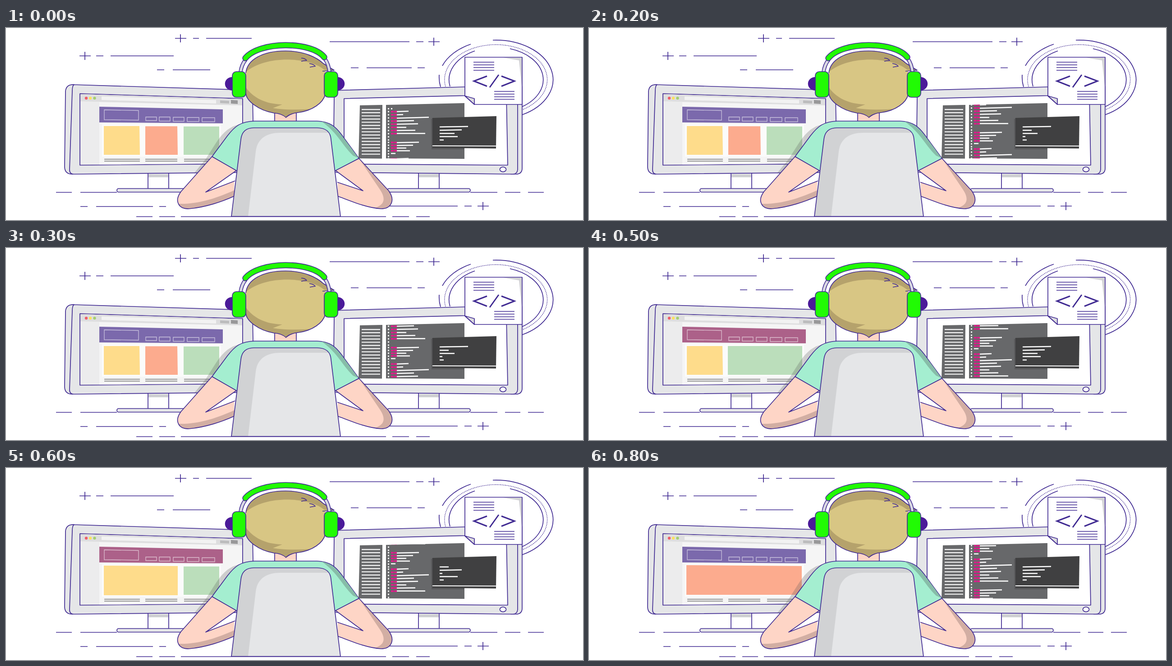
An HTML page without scripts that plays this animation: 1280x427 px, repeating every 900 ms.

```html
<!DOCTYPE html>
<html lang="en">
<head>
<meta charset="utf-8">
<title>Developer at work</title>
<style>
html, body { margin: 0; width: 100%; height: 100%; overflow: hidden; background: #fff; }
svg { display: block; width: 100vw; height: 100vh; }
.ink { stroke: #402a92; stroke-width: 1.7; stroke-linejoin: round; }
.line { fill: none; }
.dots { stroke-width: 1.3; stroke-dasharray: 2 1.6; }
.tag { stroke-width: 3; stroke-linejoin: miter; }
.white { fill: none; stroke: #fff; }
.case { fill: #e5e6e8; }
.skin { fill: #fed5c6; }
.skin-dark { fill: #d2aea3; }
.hair { fill: #d8c684; }
.hair-dark { fill: #b5a26c; }
.lime { fill: #21fb04; }
.yellow { fill: #fedc8b; }
.orange { fill: #fcab8e; }
.green { fill: #bbdebb; }

.scroll { animation: scroll .9s steps(9) infinite; }
.state, .bar { animation: .9s step-end infinite; }
.bar { animation-name: bar; }
.state { visibility: hidden; }
.cards { animation-name: cards; }
.right-wide { animation-name: right-wide; }
.left-wide { animation-name: left-wide; }
.full { animation-name: full; }
.term-a { animation-name: term-a; }
.term-b { animation-name: term-b; }
.term-c { animation-name: term-c; }

@keyframes scroll { to { transform: translateY(-99px); } }
@keyframes bar { 0%, 77.7% { fill: #7b69ac; } 44.4% { fill: #ac6189; } }
@keyframes cards { 0% { visibility: visible; } 44.4%, 100% { visibility: hidden; } }
@keyframes right-wide { 0%, 66.6%, 100% { visibility: hidden; } 44.4% { visibility: visible; } }
@keyframes left-wide { 0%, 77.7%, 100% { visibility: hidden; } 66.6% { visibility: visible; } }
@keyframes full { 0% { visibility: hidden; } 77.7%, 100% { visibility: visible; } }
@keyframes term-a { 0%, 44.4%, 88.8% { visibility: visible; } 22.2%, 66.6% { visibility: hidden; } }
@keyframes term-b { 0%, 44.4%, 100% { visibility: hidden; } 22.2% { visibility: visible; } }
@keyframes term-c { 0%, 88.8%, 100% { visibility: hidden; } 66.6% { visibility: visible; } }
</style>
</head>
<body>
<svg viewBox="0 0 1280 427" preserveAspectRatio="none">
  <defs>
    <clipPath id="editor"><path d="M843 171L1017 167V291L843 290Z"/></clipPath>
    <g id="plus"><path class="ink line" d="M-12 0H13M0 -9V9"/></g>
    <g id="code">
      <path class="white" stroke-width="3" stroke-dasharray="3 4" d="M848.5 -.5V66"/>
      <path class="white" stroke-width="3" stroke-dasharray="3 3.3" d="M848.5 68V104"/>
      <path stroke="#e5178c" stroke-width="3.5" stroke-dasharray="6 1" d="M854 1h13m-13 7h13m-13 7h13m-13 7h13m-13 7h13m-13 7h13m-13 7h13m-13 7h13M854 69.5h13m-13 6.5h13m-13 6h13m-13 6h13"/>
      <path class="white" stroke-width="2.4" d="M867 1L893 0M867 8L881 7.5M867 15.5L938 13.5M867 22L905 21M867 29L914 28M867 36H888M867 43L908 42.5M867 49.5H930M867 70L916 69M867 76.2L903 75.7M867 82H888M867 88H896M854 94h10"/>
    </g>
    <g id="stand">
      <path class="ink" fill="#fff" d="M315 322V358H361V322"/>
      <path fill="#cfd0d2" d="M316 325H360V332H316Z"/>
    </g>
  </defs>
  <rect width="1280" height="427" fill="#fff"/>

  <!-- Background dashes -->
  <use href="#plus" x="387" y="23"/>
  <use href="#plus" x="175" y="62"/>
  <use href="#plus" x="949" y="30.5"/>
  <use href="#plus" x="1058" y="396"/>
  <path class="ink line" d="M415 23h13M444 23H545M200 62h16M232 62H372M335 93h16M370 93H453
    M718 30.5H895M910 30.5h16M765 88.500h17M800 88.500H900M913 88.500h16
    M111 365.500h35M165 365.500H246M1030 365.500H1090M1107 365.500h34M1158 365.500h35
    M165 397h16M200 397H326M340 397h15M850 396H1002M1017 396h16
    M289 419.500h36M340 419.500h35M388 419.500H843M857 419.500h37M910 419.500h30"/>

  <!-- Rings -->
  <g class="ink line">
    <path d="M1080 27A127 88 0 0 1 1145 193M968 84A127 88 0 0 1 1031 36M961 104Q960 118 964 131"/>
    <path d="M985 130A104 72 0 0 1 1040 51M1118 46A104 72 0 0 1 1145 175"/>
    <path class="dots" d="M975 130A114 78 0 0 1 1087 37A114 78 0 0 1 1145 182"/>
  </g>

  <!-- Left monitor -->
  <use href="#stand"/>
  <rect class="ink" fill="#e5e6e8" x="246" y="357" width="150" height="8" rx="4"/>
  <g class="ink case">
    <path d="M151 126Q134 125 132 140L130 308Q130 325 147 325Z"/>
    <path d="M149 126L535 138Q547 139 547 150L550 321L150 325Q141 325 141 315L147 140Q147 128 151 126Z"/>
    <path fill="#ececed" d="M164 146L525 157V302L164 305Z"/>
  </g>
  <path fill="#ececed" d="M165 147L524 158V301L165 304Z"/>
  <path fill="#f5f5f5" d="M207 165L524 172V301L207 304Z"/>
  <path fill="#dededf" d="M165 147L524 158V172L165 163Z"/>
  <path fill="#f2f2f2" d="M212 152L466 160V168L212 160Z"/>
  <path fill="#bcbcbd" d="M475 161L495 162V168L475 167Z"/>
  <path fill="#989899" d="M499 160L514 161V169L499 168Z"/>
  <circle cx="178" cy="156" r="3.2" fill="#ee5e6b"/>
  <circle cx="187" cy="156" r="3.2" fill="#fee15f"/>
  <circle cx="196.5" cy="156" r="3.2" fill="#a5cf72"/>
  <path class="bar" fill="#7b69ac" d="M207 175L481 181V212L207 210Z"/>
  <path class="white" stroke-opacity=".6" stroke-width="1.3" d="M218 182L294 183.500V205L218 204ZM310 198h24v8h-24zM340 198h24v9h-24zM371 198.500h24v9h-24zM402 199h26v9h-26zM435 199.500h28v9h-28z"/>
  <path fill="#fbfbfb" d="M213 214H477V286H213Z"/>
  <g class="state cards">
    <path class="yellow" d="M217 218H296L297 282H217Z"/>
    <path class="orange" d="M309 218.500H380L381 282H309Z"/>
    <path class="green" d="M394 219H473V282H394Z"/>
  </g>
  <g class="state right-wide">
    <path class="yellow" d="M217 218H296L297 282H217Z"/>
    <path class="green" d="M308 218H473V282H308Z"/>
  </g>
  <g class="state left-wide">
    <path class="yellow" d="M217 217L381 218V283H217Z"/>
    <path class="green" d="M394 219H473V282H394Z"/>
  </g>
  <path class="state full orange" d="M216 216L472 218V282H216Z"/>
  <path fill="none" stroke="#757576" stroke-width="1.5" d="M218 291.700h79m12 0h71m15 0h70M218 296h79m12 0h71m15 0h70"/>
  <path fill="#555" fill-opacity=".25" d="M527 213C495 216 479 235 463 260L444 290L418 322H470L540 230Z"/>

  <!-- Right monitor -->
  <use href="#stand" x="600"/>
  <rect class="ink" fill="#e5e6e8" x="846" y="357" width="184" height="8" rx="4"/>
  <g class="ink case">
    <path d="M1040 130H1145V312Q1145 325 1131 325H1120Z"/>
    <path d="M726 321L728 153Q728 139 741 138.500L1018 131L1135 128V315Q1134 325 1124 325Z"/>
  </g>
  <path class="ink" fill="#fff" d="M750 157L1110 148L1113 305L750 302.500Z"/>
  <ellipse class="ink" fill="#fff" cx="1102.500" cy="314.500" rx="7" ry="5.300"/>
  <path fill="#67686a" d="M785 172L835 171L834 290.500L782 290Z"/>
  <path stroke="#f0f0f0" stroke-width="41" stroke-dasharray="2.4 4.7" d="M809.5 180V284"/>
  <path fill="#67686a" d="M843 171L1017 167V291L843 290Z"/>
  <g clip-path="url(#editor)">
    <g class="scroll">
      <path class="white" stroke-width="3" d="M847 179.500h3m4 0h3"/>
      <use href="#code" y="185"/>
      <use href="#code" y="290"/>
    </g>
  </g>
  <path fill="#38383a" fill-opacity=".3" d="M943 203L946 200V266H1017V270H944Z"/>
  <path fill="#404041" d="M946 200L1088 196L1087 268L946 266.500Z"/>
  <path class="white" stroke-width="2.2" d="M946 262L1087 262.500"/>
  <g class="white" stroke-width="2.4">
    <path class="state term-a" d="M962 220L1025 219M962 227.500L1011 226.500M962 234.500H995M962 241.500H1002M962 249h9"/>
    <path class="state term-b" d="M962 220L1025 219M962 227.500h20M962 234.500H995M962 241.500h6M962 249h9"/>
    <path class="state term-c" d="M962 220h20M962 227.500L1011 226.500M962 234.500h6M962 241.500H1002M962 249h9"/>
  </g>

  <!-- Document -->
  <path class="ink" fill="#fff" d="M1018 65H1145V170H1039L1018 151Z"/>
  <path fill="#d3d3d5" d="M1103 66H1144V130L1138 72Z"/>
  <path class="ink" fill="#dcdcdf" d="M1018 151L1039 157V170Z"/>
  <path class="ink line" d="M1037 76h46m-46 6h46m-46 6h46m-46 6h46M1083 141h45m-45 6h45m-45 6h45m-45 5.500h45"/>
  <path class="ink line tag" d="M1067 107L1038 118L1067 129.500M1093 104L1073 132M1099 107L1128 118L1099 129.500"/>

  <!-- Neck and shirt -->
  <path class="ink skin" d="M596 182H644V210H596Z"/>
  <path class="ink" fill="#a4eed0" d="M457 286L491 240C508 218 520 208 552 207H690C718 208 731 219 745 238L783 290L731 318H511Z"/>
  <path fill="#87bda8" d="M700 208C730 214 743 236 782 289L770 284C745 260 735 232 700 208Z"/>

  <!-- Arms -->
  <path class="skin" d="M457 286L388 364C372 386 384 403 406 402C442 399 480 386 506 374V340L443 365L511 317Z"/>
  <path class="skin-dark" d="M383 391Q390 403 406 402C442 399 480 386 506 374V361C470 377 430 392 383 391Z"/>
  <path class="ink line" d="M511 317L457 286L388 364C372 386 384 403 406 402C442 399 480 386 506 374M511 317L443 365L508 340"/>
  <path class="skin" d="M783 290L849 362C865 385 853 402 832 402C800 400 768 386 736 374V343L792 362L731 317Z"/>
  <path class="skin-dark" d="M783 290L849 362C865 385 853 402 832 402L818 400C845 392 840 374 828 357Z"/>
  <path class="ink line" d="M731 317L783 290L849 362C865 385 853 402 832 402C800 400 768 386 736 374M731 317L792 362L735 343"/>

  <!-- Chair -->
  <path fill="#d1d2d4" d="M500 419L521 248C523 230 533 222 550 222H690C710 222 720 232 721 248L742 419Z"/>
  <path fill="#e5e6e8" d="M537 419L554 275C557 248 576 233 608 233H717Q721 240 721 248L742 419Z"/>
  <path class="ink line" d="M500 419L521 248C523 230 533 222 550 222H690C710 222 720 232 721 248L742 419Z"/>

  <!-- Head -->
  <path class="hair" d="M532 100C535 70 570 51 620 51C662 51 690 66 704 79L728 94L708 96V148C704 166 680 184 648 188Q630 190 621 199Q612 190 594 189C560 183 533 162 532 145Z"/>
  <path class="hair-dark" d="M532 98C540 67 577 51 620 51C662 51 690 66 704 79L728 94L706 93C675 66 580 58 532 98Z"/>
  <path class="hair-dark" d="M532 132C548 155 575 169 613 170L592 178Q625 184 676 180Q662 187 648 188Q630 190 621 199Q612 190 594 189C560 183 533 162 532 145Z"/>
  <path class="ink line" d="M532 100C535 70 570 51 620 51C662 51 690 66 704 79L728 94L702 96M708 148C704 166 680 184 648 188Q630 190 621 199Q612 190 594 189C560 183 533 162 532 145M655 67Q663 67 667 72L655 74M673 79Q682 80 686 85L674 87"/>

  <!-- Headphones -->
  <g fill="none">
    <path stroke="#402a92" stroke-width="8.5" d="M532 70Q522 82 520 100M707 68Q716 80 718 100"/>
    <path stroke="#d9d9e2" stroke-width="5.4" d="M532 70Q522 82 520 100M707 68Q716 80 718 100"/>
    <g stroke-linecap="round">
      <path stroke="#402a92" stroke-width="13.5" d="M531 67C562 29 678 29 706 65"/>
      <path stroke="#21fb04" stroke-width="10.3" d="M531 67C562 29 678 29 706 65"/>
    </g>
  </g>
  <path fill="#4b1a99" d="M503 109C480 109 480 139 503 139ZM734 109C757 109 757 139 734 139Z"/>
  <g class="ink lime">
    <rect x="502" y="97" width="30" height="57" rx="9"/>
    <rect x="706" y="97" width="30" height="57" rx="9"/>
  </g>
</svg>
</body>
</html>
```
